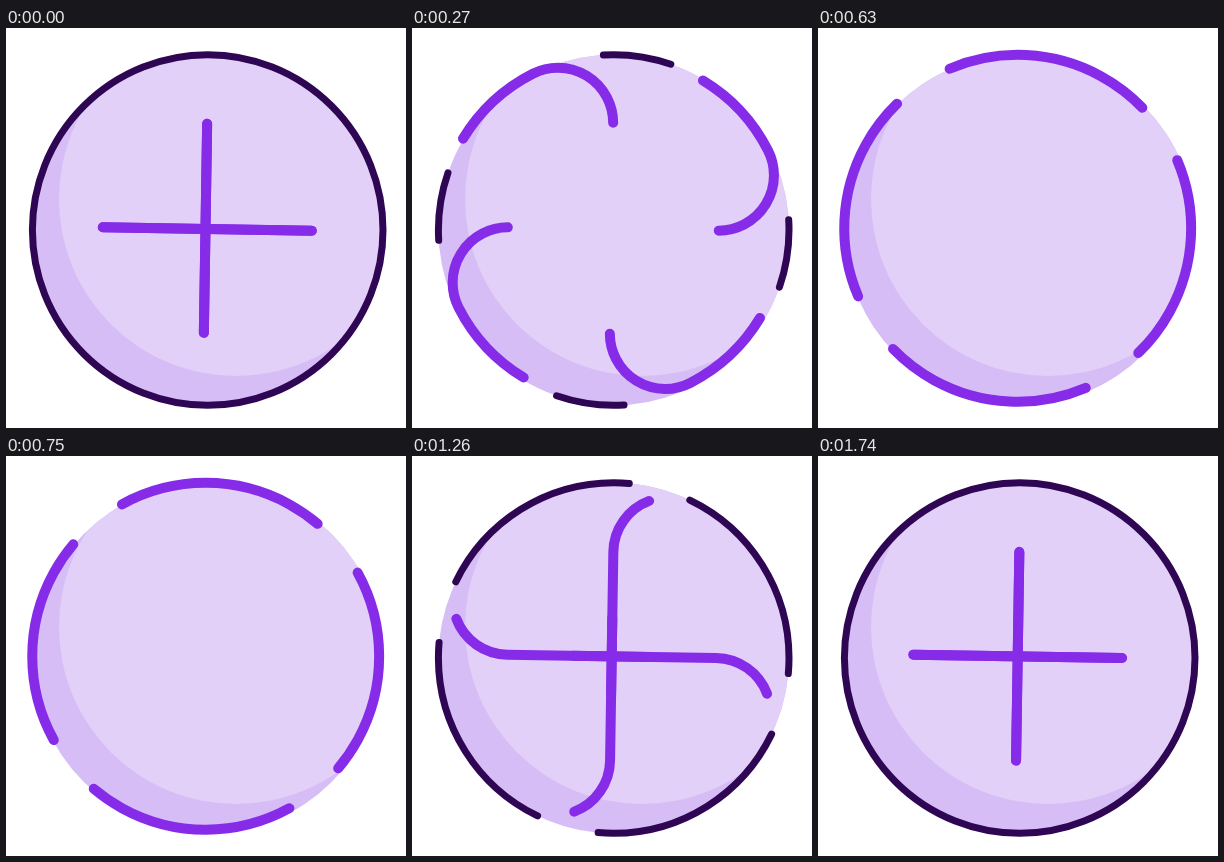
Recreate the animation shown at these times as an HTML page. Size 400 by 400 pixels, loop 3.86 s.

```html
<!DOCTYPE html>
<html lang="en">
<head>
<meta charset="utf-8">
<title>Plus button</title>
<style>
  html, body { margin: 0; width: 100%; height: 100%; overflow: hidden; background: #fff; }
  svg { display: block; width: 100%; height: 100%; }
</style>
</head>
<body>
<svg viewBox="0 0 400 400">
  <defs>
    <clipPath id="disc"><circle cx="201.7" cy="202" r="175.3"/></clipPath>
  </defs>
  <circle cx="201.7" cy="202" r="175.3" fill="#d6bdf6"/>
  <circle cx="230" cy="171" r="177" fill="#e2d0f8" clip-path="url(#disc)"/>
  <circle id="rim" cx="201.7" cy="202" r="175.3" pathLength="360"
          fill="none" stroke="#2e0653" stroke-width="7" stroke-linecap="round"/>
  <g id="strokes" fill="none" stroke="#862ce8" stroke-width="10" stroke-linecap="round"></g>
</svg>
<script>
const LOOP = 3860, STEP = 30, SWITCH = 600, END = 1740;
const H = 104.5;             // half length of a bar
const BAR = 2 * H;
const R = 173.5;             // orbit radius
const r = (R * R - H * H) / (2 * R);  // bend tangent to both bar and orbit
const OUT_DIST = 372, IN_DIST = 439;

const rim = document.getElementById('rim');
const strokes = document.getElementById('strokes');

// Point where the bend meets the orbit
const k = R / (R - r), qx = r * k, qy = -H * k;
const outPath = `M0 ${H}V${-H}A${r} ${r} 0 0 0 ${-qx} ${qy}A${R} ${R} 0 0 0 ${qx} ${-qy}`;
const inPath = `M${-qx} ${-qy}A${R} ${R} 0 0 0 ${qx} ${qy}A${r} ${r} 0 0 0 0 ${-H}V${H}`;

function addArms(d, centers) {
  const group = document.createElementNS('http://www.w3.org/2000/svg', 'g');
  for (let i = 0; i < 4; i++) {
    const arm = document.createElementNS('http://www.w3.org/2000/svg', 'path');
    const [x, y] = centers[i % 2];
    arm.setAttribute('d', d);
    arm.setAttribute('transform', `translate(${x} ${y}) rotate(${0.9 + 90 * i})`);
    group.append(arm);
  }
  group.setAttribute('stroke-dasharray', `${BAR} 3000`);
  strokes.append(group);
  return group;
}

const outArms = addArms(outPath, [[199.5, 200.3], [201.3, 201]]);
const inArms = addArms(inPath, [[199.7, 200.3], [199.7, 200.3]]);
const inLength = inArms.firstChild.getTotalLength();

// Ease with bezier handles (a, 0) and (b, 1)
function ease(x, a, b) {
  if (x <= 0) return 0;
  if (x >= 1) return 1;
  let lo = 0, hi = 1, p = 0.5;
  for (let i = 0; i < 30; i++) {
    p = (lo + hi) / 2;
    const q = 1 - p;
    if (3 * q * q * p * a + 3 * q * p * p * b + p * p * p < x) lo = p;
    else hi = p;
  }
  return p * p * (3 - 2 * p);
}

// Four equal rim pieces, each `len` degrees long
function setRim(len, offset) {
  rim.style.display = len > 0 ? '' : 'none';
  rim.setAttribute('stroke-dasharray', len < 90 ? `${len} ${90 - len}` : 'none');
  rim.setAttribute('stroke-dashoffset', offset);
}

function draw(t) {
  const leaving = t < SWITCH;
  outArms.style.display = leaving ? '' : 'none';
  inArms.style.display = leaving ? 'none' : '';
  if (leaving) {
    const moved = OUT_DIST * ease(t / SWITCH, 0.4, 0.38);
    outArms.setAttribute('stroke-dashoffset', -moved);
    setRim(Math.max(0, 90 - moved / 3.109), 3.4);
  } else {
    const left = IN_DIST * (1 - ease((t - SWITCH) / (END - SWITCH), 0.43, 0.217));
    inArms.setAttribute('stroke-dashoffset', -(inLength - BAR - left));
    const len = Math.min(90, Math.max(0, (278 - left) / 3.05));
    setRim(len, 84.9 + len);
  }
}

const start = performance.now();
function tick() {
  const t = (performance.now() - start) % LOOP;
  draw(Math.floor(t / STEP) * STEP);
  requestAnimationFrame(tick);
}
tick();
</script>
</body>
</html>
```
